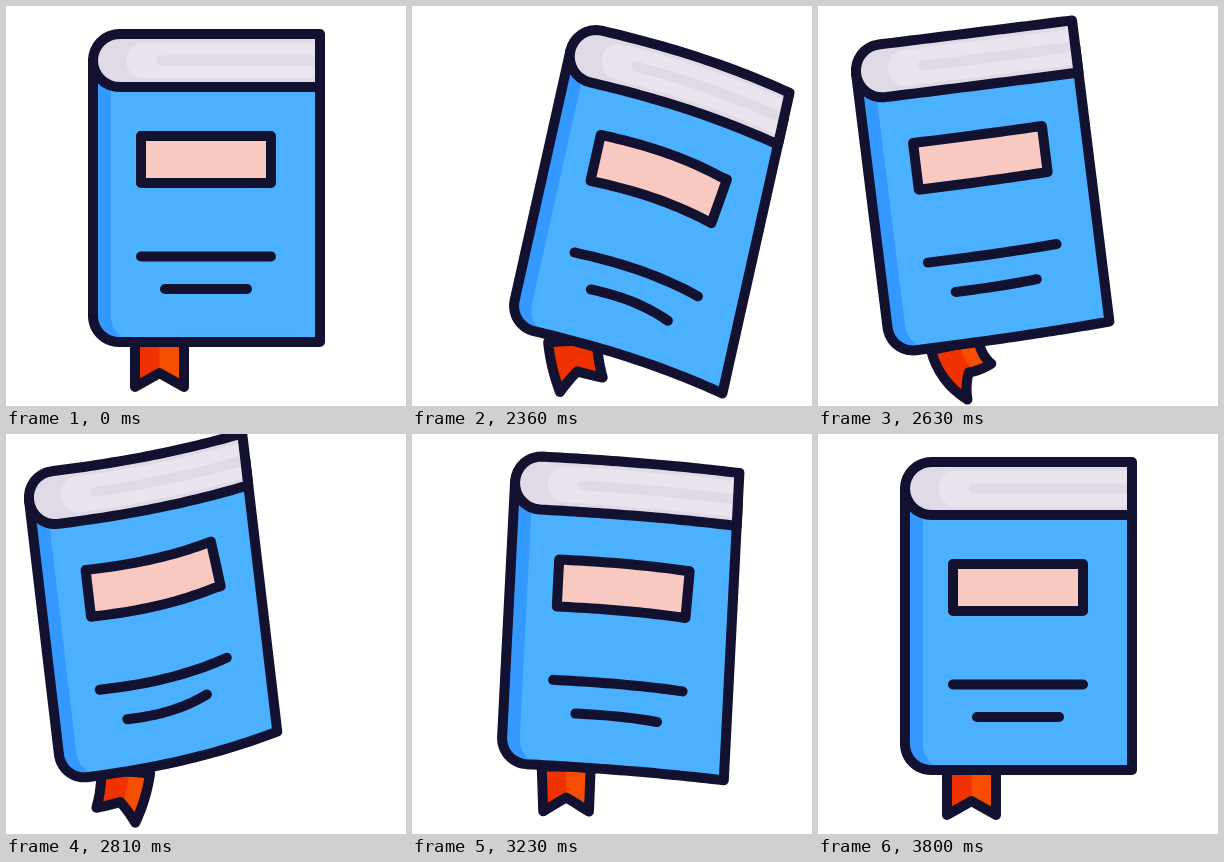
Recreate the animation shown at these times as an HTML page with a canvas. Size 400 px wide and 400 px high, loop 3.83 s.

```html
<!DOCTYPE html>
<html lang="en">
<head>
<meta charset="utf-8">
<title>Swaying book</title>
<style>
  html, body { margin: 0; width: 100%; height: 100%; overflow: hidden; background: #fff; }
  canvas { display: block; width: 100vw; height: 100vh; }
</style>
</head>
<body>
<canvas id="stage" width="400" height="400"></canvas>
<script>
const ctx = document.getElementById('stage').getContext('2d');
const LOOP = 3830, START = 2030, STEP = 30;
const TURNS = [1980, 2290, 2690, 3180, 3620];
const FOLLOW = 120;
const LEFT = 87, RIGHT = 314, BASE = 336, MID = 153.5;
const INK = '#131130', PAGE = '#e0d9e6';

const rad = deg => deg * Math.PI / 180;
const mix = (a, b, u) => a + (b - a) * u;
const clamp01 = v => Math.min(1, Math.max(0, v));

// Rest, three turning values, rest again: eased between, delayed by lag.
function swing(t, lag, ...peaks) {
  const values = [0, ...peaks, 0], s = t - lag;
  if (s <= TURNS[0] || s >= TURNS[4]) return 0;
  const i = TURNS.findIndex(turn => turn > s) - 1;
  const u = (s - TURNS[i]) / (TURNS[i + 1] - TURNS[i]);
  return mix(values[i], values[i + 1], (1 - Math.cos(Math.PI * u)) / 2);
}

const tiltAt = t => swing(t, 0, 14.25, -8.3, 3);

function poseAt(t) {
  const drag = (tiltAt(t - 45) - tiltAt(t - 55)) / 10;
  return {
    tilt: tiltAt(t),
    x: 200 + swing(t, FOLLOW, 7.8, -31.8, 3.4),
    y: BASE + swing(t, 0, 9, -3.2, -1.5),
    bendTop: swing(t, FOLLOW, 21.6, -16, 7.8),
    bendLow: swing(t, FOLLOW, 21.6, -24, 7.8),
    shrink: swing(t, FOLLOW, 4.2, 7.5, 3.2),
    seam: MID + swing(t, 0, 22, 4, 0),
    curl: 62 * Math.tanh(drag * 1400 / 62)
  };
}

// Each shape bends from its own left edge, more the further right it ends.
function bookMap(p, x0, x1) {
  const c = Math.cos(rad(p.tilt)), s = Math.sin(rad(p.tilt));
  const reach = (x1 - LEFT) / (RIGHT - LEFT);
  return ([x, y]) => {
    const bend = mix(p.bendTop, p.bendLow, clamp01((y - 54) / 282));
    const u = clamp01((x - x0) / (x1 - x0));
    const X = x - 200, Y = y - BASE + bend * reach * Math.pow(u, 2.4);
    return [p.x + X * c - Y * s, p.y + X * s + Y * c];
  };
}

function coverMap(p) {
  const map = bookMap(p, LEFT, RIGHT - p.shrink);
  const scale = 1 - p.shrink / (RIGHT - LEFT);
  return ([x, y]) => map([LEFT + (x - LEFT) * scale, y]);
}

// Curls the ribbon along its length, starting under the cover.
function ribbonMap(p, [bx, by]) {
  const angle = len => rad(p.curl * mix(0.2, 1, len / 45));
  return ([x, y]) => {
    const len = y - BASE, n = 12;
    let cx = bx, cy = by;
    for (let i = 0; i < n; i++) {
      const a = angle(len * (i + 0.5) / n);
      cx -= Math.sin(a) * len / n;
      cy += Math.cos(a) * len / n;
    }
    const a = angle(len), w = (x - MID) * (1 - p.shrink * 0.02 * len / 45);
    return [cx + w * Math.cos(a), cy + w * Math.sin(a)];
  };
}

function arc(cx, cy, r, from, to) {
  return Array.from({ length: 17 }, (_, i) => {
    const a = rad(mix(from, to, i / 16));
    return [cx + r * Math.cos(a), cy + r * Math.sin(a)];
  });
}

const corner = arc(113, 310, 26, 90, 180);
const pages = [[RIGHT, 28], ...arc(113.5, 54.5, 26.5, -90, -270), [RIGHT, 81]];
const cover = [[RIGHT, 54.5], [RIGHT, BASE], ...corner, [LEFT, 54.5]];
const spine = [[LEFT, 54.5], [105, 54.5], ...arc(131, 310, 26, 180, 120), ...corner];
const shine = [[RIGHT, 36.5], ...arc(138, 54.5, 18, -90, -270), [RIGHT, 72.5]];
const ribbon = [[129, BASE], [129, 381], [MID, 367], [178, 381], [178, BASE]];

function draw(pts, map, { fill, stroke, closed = true }) {
  ctx.beginPath();
  ctx.moveTo(...map(pts[0]));
  const count = closed ? pts.length : pts.length - 1;
  for (let i = 0; i < count; i++) {
    const [x0, y0] = pts[i], [x1, y1] = pts[(i + 1) % pts.length];
    const n = Math.ceil(Math.hypot(x1 - x0, y1 - y0) / 6) || 1;
    for (let j = 1; j <= n; j++) ctx.lineTo(...map([mix(x0, x1, j / n), mix(y0, y1, j / n)]));
  }
  if (closed) ctx.closePath();
  if (fill) { ctx.fillStyle = fill; ctx.fill(); }
  if (stroke) { ctx.strokeStyle = stroke; ctx.stroke(); }
}

function drawRibbon(p, map) {
  const notch = x => 367 + Math.abs(x - MID) * 14 / 24.5;
  const inner = Math.max(p.seam, MID);
  draw(ribbon, map, { fill: '#f03200' });
  draw([[p.seam, BASE], [p.seam, notch(p.seam)], [inner, notch(inner)], ...ribbon.slice(3)],
       map, { fill: '#f64e00' });
  draw(ribbon, map, { stroke: INK });
}

function drawTitle(p) {
  const lean = p.bendTop * 0.14;
  draw([[135, 130], [265 + lean, 130], [265 - lean, 177], [135, 177]],
       bookMap(p, 135, 265), { fill: '#f7c9c1', stroke: INK });
}

function drawLine(map, x0, x1, y, stroke) {
  draw([[x0, y], [x1, y]], map, { stroke, closed: false });
}

function render(t) {
  const p = poseAt(t), book = coverMap(p);
  ctx.clearRect(0, 0, 400, 400);
  ctx.lineWidth = 10;
  ctx.lineCap = ctx.lineJoin = 'round';

  drawRibbon(p, ribbonMap(p, book([MID, BASE])));

  draw(cover, book, { fill: '#4bb1ff' });
  draw(spine, book, { fill: '#3399ff' });
  draw(cover, book, { stroke: INK });

  draw(pages, book, { fill: PAGE });
  draw(shine, book, { fill: '#e9e4ee' });
  drawLine(book, 156, 312, 54.5, PAGE);
  draw(pages, book, { stroke: INK });

  drawTitle(p);
  drawLine(bookMap(p, 135, 265), 135, 265, 250.5, INK);
  drawLine(bookMap(p, 159, 241), 159, 241, 283, INK);
}

function tick() {
  const t = performance.now() % LOOP;
  render(t < START ? 0 : START + Math.floor((t - START) / STEP) * STEP);
  requestAnimationFrame(tick);
}
tick();
</script>
</body>
</html>
```
